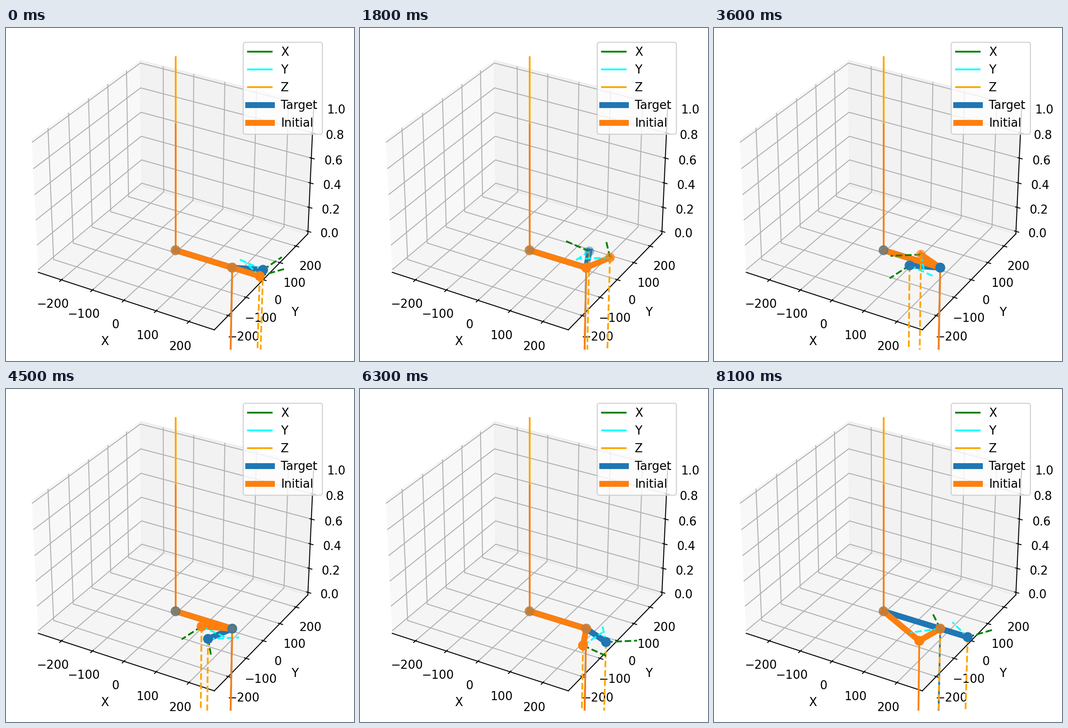
A matplotlib script for the animation above (9 s loop, 765 px wide and 732 px high).

```python
import numpy as np
import matplotlib.pyplot as plt
from matplotlib.animation import FuncAnimation
from matplotlib.lines import Line2D

W, H, DPI = 765, 732, 186.4
LEFT, BOTTOM, SIDE = 18.9, 25.0, 689    # square axes, in pixels
L1, L2 = 180, 85        # link lengths
REACH = L1 + L2
TOOL_TURN = 1.0         # tool frame rotation relative to the last link, rad
BLUE, ORANGE = "tab:blue", "tab:orange"
AXIS_COLORS = ("green", "cyan", "orange")

plt.rcParams["font.family"] = "DejaVu Sans"
fig = plt.figure(figsize=((W + 1e-6) / DPI, (H + 1e-6) / DPI), dpi=DPI,
                 facecolor="white")
ax = fig.add_axes([LEFT / W, BOTTOM / H, SIDE / W, SIDE / H],
                  projection="3d", computed_zorder=False)
ax.view_init(elev=30, azim=-60)

lim = REACH * 25 / 24
ax.set_xlim(-lim, lim)
ax.set_ylim(-lim, lim)
ax.set_zlim(-1 / 48, 49 / 48)
ax.set_xticks(range(-200, 201, 100))
ax.set_yticks(range(-200, 201, 100))
ax.set_zticks(np.linspace(0, 1, 6))
ax.set_xlabel("X")
ax.set_ylabel("Y")


def segment(a, b, **style):
    return ax.plot(*zip(a, b), **style)[0]


# Base frame
for tip, color in zip(1.5 * np.eye(3), AXIS_COLORS):
    segment((0, 0, 0), tip, color=color)

handles = [Line2D([], [], color=c, label=n) for c, n in zip(AXIS_COLORS, "XYZ")]
handles += [Line2D([], [], color=BLUE, lw=5, label="Target"),
            Line2D([], [], color=ORANGE, lw=5, label="Initial")]
ax.legend(handles=handles, loc="upper right")

# Joint poses: straight, eight points on a circle, then the circle's centre
fold = 2 * np.arcsin(L2 / 2 / L1)
poses = [(0.0, 0.0)]
poses += [(0.0, np.radians(22.5 + 45 * i)) for i in range(8)]
poses.append((-fold, np.pi / 2 + fold / 2))
N = len(poses)


def polar(r, a):
    return np.array([r * np.cos(a), r * np.sin(a), 0.0])


def draw_arm(pose, color, zorder):
    q1, q2 = pose
    base = np.zeros(3)
    elbow = polar(L1, q1)
    tip = elbow + polar(L2, q1 + q2)
    parts = [ax.plot(*zip(base, elbow, tip), color=color, lw=5)[0]]

    # The base holds two coincident nodes
    nodes = np.array([base, base, elbow, tip])
    parts.append(ax.scatter(*nodes.T, s=55, c=color, zorder=zorder))

    # Joint axes
    parts.append(segment(base, (0, 0, 1), color=color))
    parts.append(segment(elbow, elbow - (0, 0, 2), color=color))

    # Tool frame
    turn = q1 + q2 + TOOL_TURN
    ends = (polar(L2, turn), polar(L2, turn + np.pi / 2), np.array([0, 0, -3]))
    for end, c in zip(ends, AXIS_COLORS):
        parts.append(segment(tip, tip + end, color=c, ls="--"))
    return parts


drawn = []


def update(k):
    while drawn:
        drawn.pop().remove()
    # Nodes of the arm nearer to the viewer go on top
    target_near = k in (4, 5, 6)
    drawn.extend(draw_arm(poses[(k + 1) % N], BLUE, 4.5 if target_near else 3.5))
    drawn.extend(draw_arm(poses[k], ORANGE, 4))
    return drawn


anim = FuncAnimation(fig, update, frames=N, interval=900, repeat=True,
                     repeat_delay=0, init_func=lambda: update(0))
plt.show()
```
